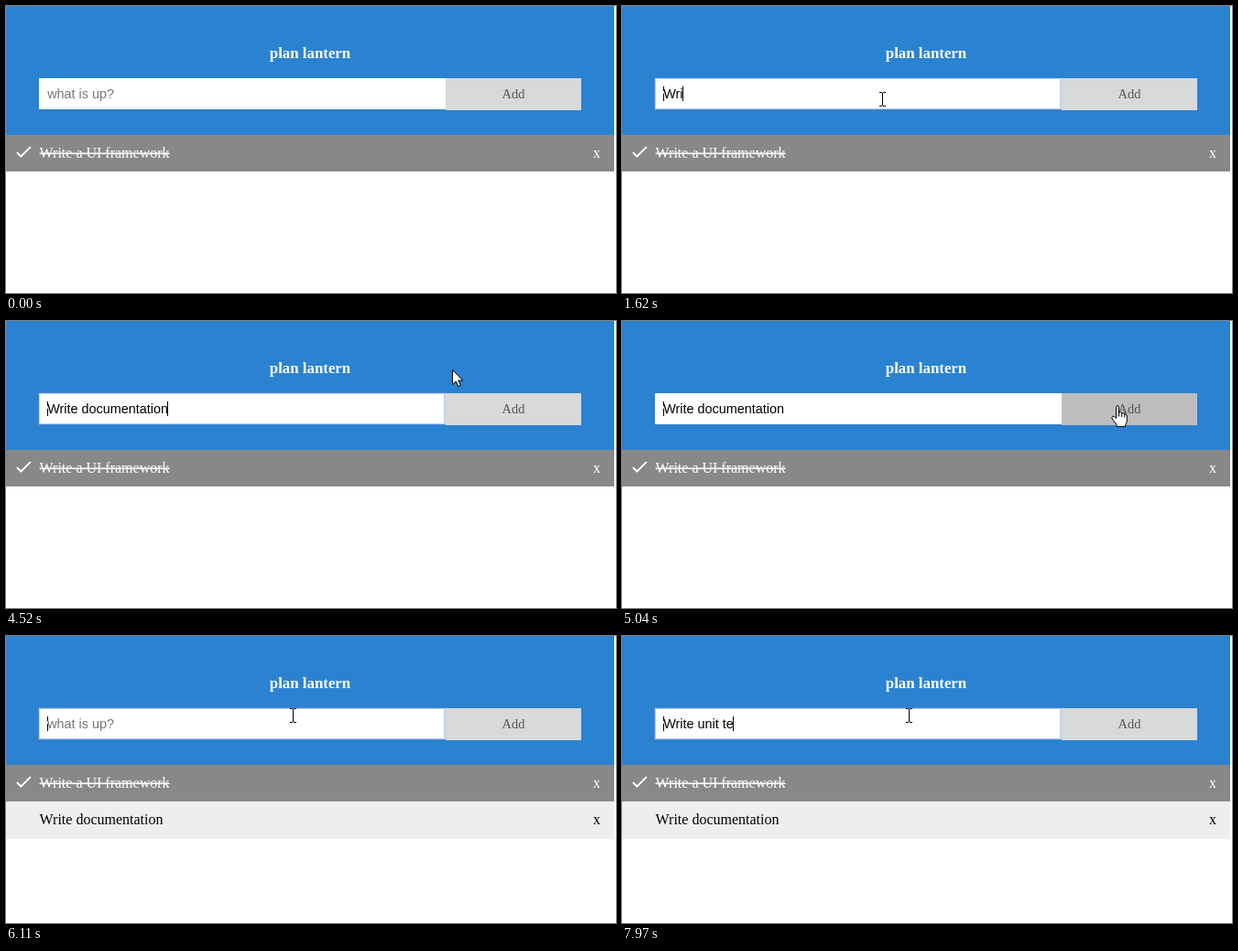
These frames come from a looping animation (666 px wide and 314 px high, 8 s). An HTML page:

```html
<!DOCTYPE html>
<html lang="en">
<head>
<meta charset="utf-8">
<title>Task list</title>
<style>
  html, body { margin: 0; width: 100%; height: 100%; overflow: hidden; background: #fff; }
  svg { display: block; width: 100vw; height: 100vh; }
  text { font: 16px "Liberation Serif", "Times New Roman", serif; white-space: pre; }
  .title { font-size: 16.85px; font-weight: bold; }
  .add { font-size: 14.4px; }
  .field { font: 14.4px "Liberation Sans", Arial, sans-serif; }
  .done { text-decoration: line-through; }
</style>
</head>
<body>
<svg viewBox="0 0 666 314" preserveAspectRatio="xMinYMin meet">
  <rect width="664" height="141" fill="#2b82d0"/>
  <text class="title" x="332" y="57" fill="#fff" text-anchor="middle">plan lantern</text>

  <rect x="36" y="79" width="444" height="34" fill="#fff"/>
  <rect id="button" x="480" y="79" width="148" height="35" fill="#d9d9d9"/>
  <text class="add" x="554" y="101" fill="#555" text-anchor="middle">Add</text>
  <g id="ring" fill="none">
    <rect x="35.5" y="78.5" width="444" height="35" stroke="#7896c8" stroke-opacity=".4"/>
    <rect x="36.5" y="79.5" width="442" height="33" stroke="#6496ff" stroke-opacity=".45"/>
  </g>
  <text id="field" class="field" x="45.2" y="101"></text>
  <path id="trace" d="M45 88h1v5h-1zM45 96h1v8h-1z"/>
  <rect id="caret" y="88" width="1" height="16"/>

  <rect y="141" width="664" height="40" fill="#888"/>
  <path transform="translate(8 148.3) scale(.93)" fill="#fff"
        d="M9 16.17L4.83 12l-1.42 1.41L9 19 21 7l-1.41-1.41z"/>
  <text class="done" x="36.6" y="166" fill="#fff">Write a UI framework</text>
  <text x="641" y="166" fill="#fff">x</text>
  <g id="added">
    <rect y="181" width="664" height="41" fill="#eee"/>
    <text x="36.6" y="206">Write documentation</text>
    <text x="641" y="206">x</text>
  </g>

  <g id="arrow">
    <path d="M.5 .5V16.5L4.3 13L6.8 18.6L9.3 17.5L6.9 12H11.8Z" fill="#fff" stroke="#000"/>
  </g>
  <g id="beam" fill="none" stroke="#000">
    <path d="M-3 -7.5H0M1 -7.5H4M.5 -7V7M-3 7.5H0M1 7.5H4"/>
  </g>
  <g id="hand">
    <path d="M-1.5 12V1.5Q-1.5 -.3 0 -.3T1.5 1.5V7Q4.5 5.8 4.7 8Q7.5 7 7.7 9Q10.3 8.4 10.3 11V16Q10.3 18.5 8.6 20.3V22.5H-1V20.3L-5.3 14.8Q-7 12.3 -5.4 11.3Q-3.8 10.6 -1.5 13.5Z"
          fill="#fff" stroke="#000" stroke-linejoin="round"/>
    <path d="M1.5 7V11.5M4.7 8V12M7.7 9V12.5" fill="none" stroke="#000"/>
  </g>
</svg>
<script>
const LOOP = 8000;
const SUBMIT = 5110;
const el = id => document.getElementById(id);
const show = (id, on) => el(id).setAttribute("visibility", on ? "visible" : "hidden");

// [time, characters typed at that time]
const firstEntry = [
  [1190, "W"], [1440, "r"], [1620, "i"], [1730, "t"], [1830, "e"], [1940, " "],
  [2370, "d"], [2480, "o"], [2580, "c"], [2690, "u"],
  [2870, "m"], [2990, "en"], [3110, "t"], [3290, "a"],
  [3470, "t"], [3590, "i"], [3710, "o"], [3840, "n"]
];
const secondEntry = [
  [6290, "W"], [6470, "r"], [6580, "i"], [6690, "t"], [6810, "e"], [6920, " "],
  [7220, "u"], [7420, "n"], [7600, "i"], [7720, "t "], [7920, "t"], [7970, "e"]
];

// Pointer stops: [time, x, y]
const stops = [
  [50, 533, 288], [180, 470, 235], [310, 360, 160], [440, 290, 108], [498, 284, 102],
  [4519, 284, 102], [4520, 487, 53], [4660, 505, 72], [4800, 530, 88], [4900, 541, 93],
  [5080, 541, 93], [5170, 505, 100], [5290, 402, 108], [5360, 345, 98], [5430, 313, 87]
];

function typed(entry, t) {
  return entry.filter(key => key[0] <= t).map(key => key[1]).join("");
}

function sampleTime(t) {
  const [start, step] = t < 4520 ? [50, 64] : [4520, 70];
  return start + Math.floor((t - start) / step) * step;
}

function pointerAt(t) {
  const time = sampleTime(t);
  const next = stops.findIndex(stop => stop[0] > time);
  if (next < 0) return stops[stops.length - 1].slice(1);
  if (next === 0) return stops[0].slice(1);
  const [a, b] = [stops[next - 1], stops[next]];
  const k = (time - a[0]) / (b[0] - a[0]);
  return [1, 2].map(i => Math.round(a[i] + (b[i] - a[i]) * k));
}

function drawPointer(t) {
  const [x, y] = pointerAt(t);
  const inRow = y >= 79 && y < 114;
  const kind = inRow && x >= 480 && x < 628 ? "hand"
    : inRow && x >= 36 && x < 480 ? "beam" : "arrow";
  for (const id of ["arrow", "beam", "hand"]) show(id, t >= 50 && id === kind);
  el(kind).setAttribute("transform", `translate(${x} ${y})`);
  el("button").setAttribute("fill", kind === "hand" ? "#bdbdbd" : "#d9d9d9");
}

function draw(t) {
  const text = typed(t < SUBMIT ? firstEntry : secondEntry, t);
  const focused = (t >= 498 && t < 4990) || t >= 5610;
  const blinkedOff = !text && ((t >= 1060 && t < 1190) || t >= 6110);

  const field = el("field");
  field.textContent = text || "what is up?";
  field.setAttribute("fill", text ? "#000" : "#757575");
  const end = text ? Math.floor(45.2 + field.getComputedTextLength()) : 45;
  el("caret").setAttribute("x", end);

  show("ring", focused);
  show("caret", focused && !blinkedOff);
  show("trace", t >= 498);
  show("added", t >= SUBMIT);
  drawPointer(t);
}

const begin = performance.now();
function tick() {
  draw((performance.now() - begin) % LOOP);
  requestAnimationFrame(tick);
}
tick();
</script>
</body>
</html>
```
